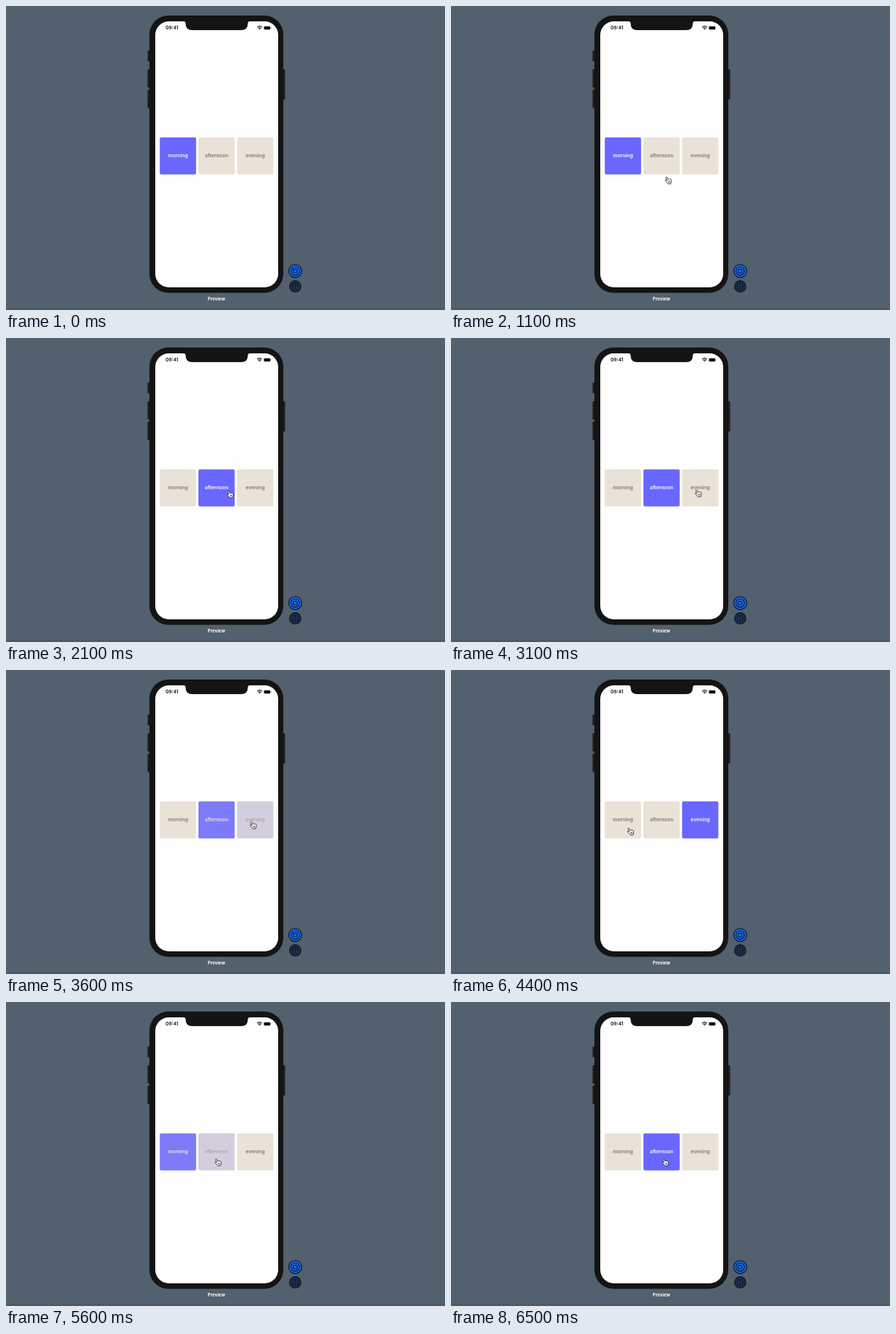
Write an HTML page that moves like this. It is 600 by 416 pixels and loops after 6600 ms.

```html
<!DOCTYPE html>
<html lang="en">
<head>
<meta charset="utf-8">
<title>Day part picker</title>
<style>
  html, body { margin: 0; width: 100%; height: 100%; overflow: hidden; background: #53606d; }
  svg { display: block; width: 600px; height: 416px; }
  text { font-family: Inter, sans-serif; font-weight: 600; }
  .tile text { font-size: 6.8px; text-anchor: middle; }
</style>
</head>
<body>
<svg viewBox="0 0 600 416">
  <rect width="600" height="416" fill="#53606d"/>
  <rect y="413" width="600" height="3" fill="#4d5966"/>

  <g fill="#1c1c1e">
    <rect x="193.5" y="61" width="4" height="14.5" rx="1"/>
    <rect x="193.5" y="86.5" width="4" height="25" rx="1"/>
    <rect x="193.5" y="114.5" width="4" height="25.5" rx="1"/>
    <rect x="377.5" y="86.5" width="4" height="41.5" rx="1"/>
  </g>
  <rect x="196" y="13" width="183" height="379.5" rx="26" fill="#141414"/>
  <rect x="204" y="21" width="168" height="364" rx="18.5" fill="#fefefe"/>
  <path d="M242.5 20.5H333.5V21Q330.5 21 330.5 24Q330.5 33 321.5 33H254.500Q245.500 33 245.500 24Q245.500 21 242.500 21Z" fill="#141414"/>

  <text x="218" y="32.4" font-size="6.6" fill="#111">09:41</text>
  <g fill="none" stroke="#111" stroke-width="1.1">
    <path d="M343.2 29.100Q346.600 26.100 350 29.100"/>
    <path d="M344.500 30.600Q346.600 28.800 348.700 30.600"/>
  </g>
  <path d="M345.500 31.300Q346.600 30.400 347.700 31.300L346.600 32.400Z" fill="#111"/>
  <rect x="352.500" y="27.800" width="8.800" height="4.400" rx="1.100" fill="#111"/>
  <rect x="361.700" y="29.200" width=".7" height="1.600" rx=".3" fill="#555"/>

  <g id="tiles"></g>

  <text x="287.700" y="402.600" font-size="6.050" text-anchor="middle" fill="#fff" style="font-weight:700">Preview</text>

  <g transform="translate(395.300 362.700)" fill="#1769ee" stroke="#101c30">
    <circle r="8.900" stroke-width="1.300"/>
    <circle r="5.700" stroke-width="1.200"/>
    <rect x="-2.500" y="-2.300" width="5" height="4.600" rx="1" stroke-width="1.100"/>
  </g>
  <g transform="translate(395.300 383.700)" fill="#17202c" stroke="#194a88">
    <circle r="8.400" stroke="none"/>
    <circle r="5.500" stroke-width=".8"/>
    <path d="M-1.800 -2.800V2.800M1.500 -2.800V2.800" stroke-width="1"/>
  </g>

  <path id="hand" d="M-2.600 -4.500C-3.600 -4.500 -3.700 -3.500 -3.200 -2.700L-1.700 .2C-2.600 -.6 -4.100 -.9 -4.200 .1C-4.200 .8 -3 1.500 -2.300 2.400C-1.600 3.500 -1.100 4.300 -.3 4.700H3.100C3.300 3.600 4.200 2.500 4.100 .8C4.100 -.5 3.900 -1.500 3 -1.500C2.500 -2 1.800 -2.100 1.300 -1.700C.8 -2.100 .1 -2.100 -.4 -1.600L-1.600 -3.900Q-2 -4.500 -2.600 -4.500ZM.1 .9L.7 3M1.600 .7L1.900 2.900"
    fill="#fff" stroke="#222" stroke-width=".9" stroke-linejoin="round"/>
</svg>
<script>
const LOOP = 6600;
const BEIGE = [232, 226, 215], BLUE = [105, 103, 255], GREY = [125, 121, 116], WHITE = [255, 255, 255];
const PALE = [158, 154, 148];

const labels = ["morning", "afternoon", "evening"];
// Each tap: when the label pales, when the colours swap, and the chosen tile.
const taps = [
  { press: 1650, swap: 1820, to: 1 },
  { press: 3450, swap: 3560, to: 2 },
  { press: 4650, swap: 4760, to: 0 },
  { press: 5400, swap: 5560, to: 1 }
];
// Pointer stops: time, x, y.
const stops = [
  [560, 228, 420], [1250, 306.5, 214], [2350, 306.5, 214], [2850, 338, 212.5],
  [3950, 338, 212.5], [4400, 245.5, 221], [4950, 245.5, 221], [5100, 275.5, 224],
  [5350, 290, 219.5], [6499, 290, 219.5], [6500, 293, 219.5]
];

const clamp = v => Math.min(1, Math.max(0, v));
const ease = v => v * v * (3 - 2 * v);
const mix = (a, b, k) => a + (b - a) * k;
const blend = (a, b, k) => a.map((v, i) => mix(v, b[i], k));
const rgb = c => `rgb(${c.map(Math.round)})`;

const group = document.getElementById("tiles");
group.innerHTML = labels.map((label, i) => {
  const x = 210.2 + i * 52.8;
  return `<g class="tile"><rect x="${x}" y="179.700" width="49.600" height="50.700" rx="2"/>
    <text x="${x + 24.8}" y="207.300">${label}</text></g>`;
}).join("");
const tiles = [...group.children];
const hand = document.getElementById("hand");

function drawTiles(t) {
  const chosen = [1, 0, 0], pressed = [0, 0, 0];
  for (const { press, swap, to } of taps) {
    const k = ease(clamp((t - swap) / 160));
    chosen.forEach((v, i) => chosen[i] = mix(v, i === to ? 1 : 0, k));
    pressed[to] = Math.max(pressed[to], clamp((t - press) / 120) * (1 - k));
  }
  tiles.forEach((tile, i) => {
    tile.children[0].setAttribute("fill", rgb(blend(BEIGE, BLUE, chosen[i])));
    const ink = blend(GREY, PALE, pressed[i]);
    tile.children[1].setAttribute("fill", rgb(blend(ink, WHITE, chosen[i])));
  });
}

function drawHand(t) {
  hand.style.display = t < stops[0][0] ? "none" : "";
  const next = stops.findIndex(s => s[0] > t);
  const b = stops.at(next), a = next > 0 ? stops[next - 1] : b;
  const k = a === b ? 1 : ease((t - a[0]) / (b[0] - a[0]));
  hand.setAttribute("transform", `translate(${mix(a[1], b[1], k)} ${mix(a[2], b[2], k)})`);
}

function frame() {
  const t = performance.now() % LOOP;
  drawTiles(t);
  drawHand(t);
  requestAnimationFrame(frame);
}
frame();
</script>
</body>
</html>
```
